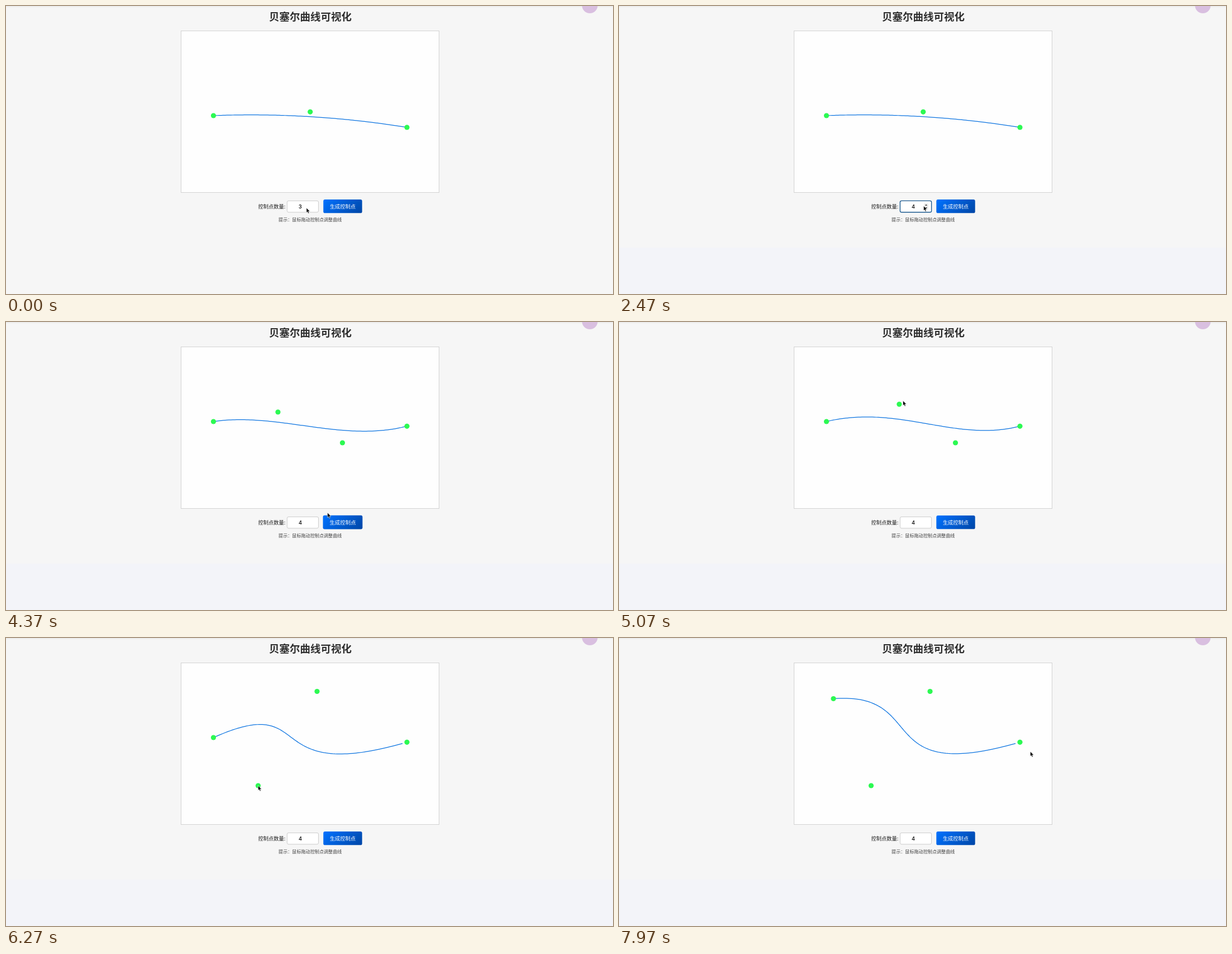
Write an HTML page that moves like this. It is 1087 px wide and 515 px high and loops after 8000 ms.

```html
<!DOCTYPE html>
<html lang="zh">
<head>
<meta charset="utf-8">
<title>贝塞尔曲线可视化</title>
<style>
  html, body { margin: 0; width: 100%; height: 100%; overflow: hidden; background: #f6f6f6; }
  svg { display: block; width: 1087px; height: 515px; }
  text { font: 9.25px "Noto Sans CJK SC", "Noto Sans CJK", sans-serif; fill: #222; text-anchor: middle; }
  .title { font-size: 18.5px; font-weight: 700; fill: #2f2f2f; }
  .hint { font-size: 8.1px; fill: #444; }
  .action { font-weight: 500; fill: #fff; }
  .digit { font: 500 9.25px Inter, "Liberation Sans", sans-serif; fill: #000; }
</style>
</head>
<body>
<svg viewBox="0 0 1087 515">
  <defs>
    <linearGradient id="topShade" x2="0" y2="1">
      <stop stop-color="#e9e9e9"/><stop offset="1" stop-color="#f6f6f6"/>
    </linearGradient>
    <linearGradient id="blue" gradientUnits="userSpaceOnUse" x1="579.6" y1="334.8" x2="626.4" y2="381.6">
      <stop stop-color="#0072ff"/><stop offset="1" stop-color="#0046a6"/>
    </linearGradient>
    <linearGradient id="navy" href="#blue">
      <stop stop-color="#004aa6"/><stop offset="1" stop-color="#003478"/>
    </linearGradient>
  </defs>
  <rect width="1087" height="515" fill="#f6f6f6"/>
  <rect id="tint" y="432" width="1087" height="83" fill="#f3f4f9"/>
  <rect width="1087" height="3" fill="url(#topShade)"/>
  <circle cx="1045.5" cy="-1" r="14" fill="#d9bfe0"/>

  <text class="title" x="545" y="26">贝塞尔曲线可视化</text>
  <rect x="313.5" y="44.5" width="462" height="289" fill="#fefefe" stroke="#d2d2d2"/>
  <path id="curve" fill="none" stroke="#0b73e0" stroke-width="1.25"/>
  <g id="dots" fill="#2cf952"></g>

  <text x="476" y="361.8">控制点数量:</text>
  <rect id="field" x="503.4" y="348.4" width="56.2" height="20.4" rx="2.6" fill="#fff"/>
  <text id="digit" class="digit" x="527" y="361.5"></text>
  <g id="spinner">
    <rect x="546" y="353" width="8" height="11" rx="1.5" fill="#ededed"/>
    <rect id="pressed" x="546" y="358.5" width="8" height="5.5" rx="1" fill="#c4c4c4"/>
    <path d="M548 357l2-2.4 2 2.4zM548 360l2 2.4 2-2.4z" fill="#444"/>
  </g>
  <g id="button">
    <rect id="face" x="568.3" y="346" width="69.4" height="24.3" rx="2.9"/>
    <text class="action" x="603" y="361.8">生成控制点</text>
  </g>
  <text class="hint" x="544.7" y="384.9">提示：鼠标拖动控制点调整曲线</text>

  <g id="cursor" stroke="#fff" stroke-width=".6" stroke-linejoin="round">
    <path id="arrow" d="M0 0V8.5L1.9 6.8 3.2 9.9 4.8 9.2 3.5 6.2H6.2Z"/>
    <path id="hand" d="M-.3 .4C-.1-.5 1-.4 1.1.4L1.8 3.4C2.6 2.9 3.1 3.2 3.3 3.7 4 3.3 4.6 3.6 4.8 4.1 5.7 3.9 6 4.5 6 5.2 6.1 7.2 5.5 8.2 5.2 10H.9C.4 8.4-1 7.3-2 5.9-1.9 4.9-.9 5-.1 6Z"
      fill="#fff" stroke="#111" stroke-width=".85"/>
  </g>
</svg>
<script>
const LOOP = 8000;
const DRAG_LAG = 25;
const CLICK = 3720;
const $ = id => document.getElementById(id);

// Control points are spread evenly across the canvas
const spread = (...heights) =>
  heights.map((y, i) => ({ x: 371.5 + 346.5 * i / (heights.length - 1), y }));
const three = spread(196, 189.3, 217);
const four = spread(178, 161, 216, 186.3);

const rest = { x: 538, y: 361 };
const onButton = { x: 585, y: 360 };

// Pointer trips; "drag" names the control point that is carried along
const trips = [
  { at: 670, lasts: 280, to: onButton },
  { at: 1250, lasts: 130, to: { x: 545.5, y: 357.5 } },
  { at: 3230, lasts: 270, to: { x: 611, y: 366.5 } },
  { at: 3800, lasts: 130, to: onButton },
  { at: 4270, lasts: 530, to: four[1] },
  { at: 4942, lasts: 350, to: { x: 557, y: 95.5 }, drag: 1 },
  { at: 5400, lasts: 200, to: four[2] },
  { at: 5621, lasts: 600, to: { x: 451.5, y: 264 }, drag: 2, bow: -6.5 },
  { at: 6500, lasts: 450, to: four[0] },
  { at: 7100, lasts: 300, to: { x: 384, y: 108.5 }, drag: 0, bow: 13 },
  { at: 7570, lasts: 400, to: { x: 736.5, y: 203 } }
];
trips.forEach((trip, i) => trip.from = i ? trips[i - 1].to : rest);

const mix = (a, b, k) => ({ x: a.x + (b.x - a.x) * k, y: a.y + (b.y - a.y) * k });

function travel({ at, lasts, from, to, bow = 0 }, t) {
  const k = Math.min(1, Math.max(0, (t - at) / lasts));
  const e = k * k * (3 - 2 * k);
  const dx = to.x - from.x, dy = to.y - from.y;
  const bulge = 4 * bow * e * (1 - e) / Math.hypot(dx, dy);
  const p = mix(from, to, e);
  return { x: p.x + dy * bulge, y: p.y - dx * bulge };
}

const pointerAt = t => travel(trips.findLast(trip => trip.at <= t) || trips[0], t);

function pointsAt(t) {
  if (t < CLICK + 60) return three;
  return four.map((home, i) => {
    const trip = trips.find(({ drag }) => drag === i);
    return trip ? travel(trip, t - DRAG_LAG) : home;
  });
}

function bezier(points, k) {
  while (points.length > 1) points = points.slice(1).map((p, i) => mix(points[i], p, k));
  return points[0];
}

function hovering(t) {
  const { x, y } = pointerAt(t);
  return Math.abs(x - 603) < 35 && Math.abs(y - 358) < 13;
}

// Share of the last 200 ms spent on the button, used as its growth
function growth(t) {
  const samples = 20;
  let hits = 0;
  for (let i = 0; i < samples; i++) hits += hovering(t - i * 200 / samples);
  return hits / samples;
}

const set = (id, attributes) =>
  Object.entries(attributes).forEach(([name, value]) => $(id).setAttribute(name, value));
const show = (id, on) => set(id, { visibility: on ? 'visible' : 'hidden' });

function draw(t) {
  const points = pointsAt(t);
  const line = Array.from({ length: 100 }, (_, i) => {
    const { x, y } = bezier(points, i / 100);
    return `${x.toFixed(2)} ${y.toFixed(2)}`;
  });
  set('curve', { d: 'M' + line.join('L') });
  $('dots').innerHTML = points.map(({ x, y }) => `<circle cx="${x}" cy="${y}" r="4.6"/>`).join('');

  const over = hovering(t);
  const scale = 1 + .023 * growth(t);
  set('button', { transform: `translate(603 358.2) scale(${scale}) translate(-603 -358.2)` });
  set('face', { fill: over ? 'url(#navy)' : 'url(#blue)' });

  const focused = t >= 1600 && t < CLICK;
  set('field', { stroke: focused ? '#1c5a90' : '#ccc', 'stroke-width': focused ? 1.4 : 1 });
  $('digit').textContent = t < 1700 ? 3 : 4;
  show('spinner', t >= 1320 && t < CLICK);
  show('pressed', t >= 1320 && t < 1500);
  show('tint', t >= 670);

  const { x, y } = pointerAt(t);
  set('cursor', { transform: `translate(${x} ${y})` });
  show('arrow', !over);
  show('hand', over);
}

const start = performance.now();
function tick() {
  draw((performance.now() - start) % LOOP);
  requestAnimationFrame(tick);
}
tick();
</script>
</body>
</html>
```
